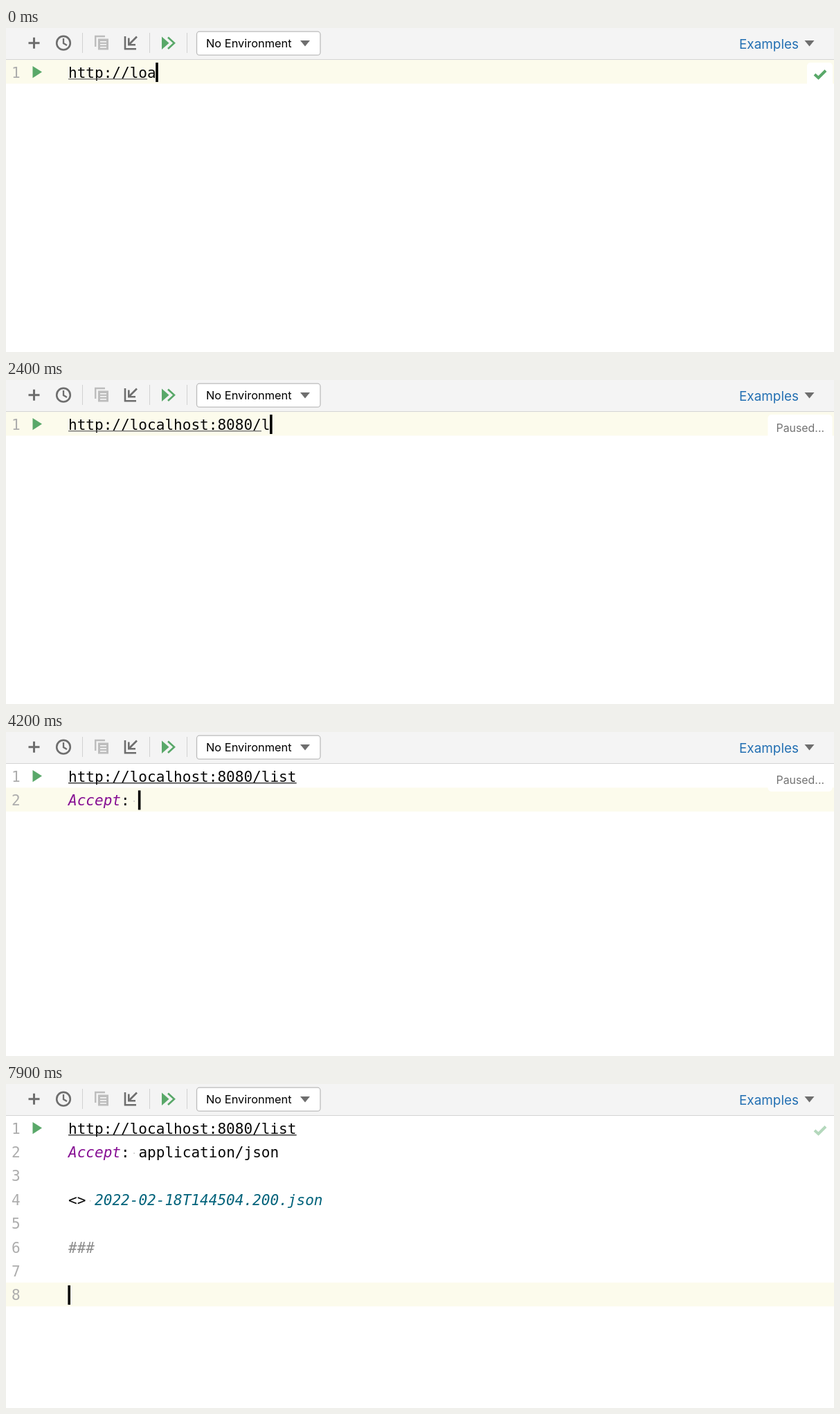
An HTML page with a canvas for the animation above (8 s loop, 1196 by 468 pixels).

```html
<!DOCTYPE html>
<html lang="en">
<head>
<meta charset="utf-8">
<title>HTTP request editor</title>
<style>
html, body { margin: 0; width: 100%; height: 100%; overflow: hidden; background: #fff; }
canvas { display: block; width: 1196px; height: 468px; }
</style>
</head>
<body>
<canvas id="stage"></canvas>
<script>
const W = 1196, H = 468, LOOP = 8000;
const canvas = document.getElementById('stage');
const ratio = window.devicePixelRatio || 1;
canvas.width = W * ratio;
canvas.height = H * ratio;
const ctx = canvas.getContext('2d');
ctx.scale(ratio, ratio);

const MONO = '"DejaVu Sans Mono", monospace';
const UI = 'Inter, sans-serif';
const CODE = '21.06px ' + MONO;
const CODE_ITALIC = 'italic ' + CODE;
const LIST = '21.6px ' + MONO;
const CHAR = 12.68, LEFT = 90, LINE = 34.4, TOP = 46, ROW = 31.7;
const GREY = '#6e6e6e', GREEN = '#59a869', BLUE = '#2470b3';

const hosts = ['loc', 'localhost', 'localhost:80', 'localhost:3000', 'localhost:8080'];
const paths = ['list', 'login', 'logout'];
const headers = ['Accept', 'Accept-Additions', 'Accept-Charset', 'Accept-Datetime',
  'Accept-Encoding', 'Accept-Features', 'Accept-Language', 'Accept-Patch',
  'Accept-Post', 'Accept-Ranges', 'Access-Control'];
const types = ['application/atom+xml', 'application/ecmascript', 'application/json',
  'application/vnd.api+json', 'application/x-www-form-urlencoded',
  'application/xhtml+xml', 'application/xml', 'audio/mpeg', 'audio/ogg',
  'multipart/form-data', 'text/html'];

const hostList = { x: 137, line: 1, items: hosts, match: 3, icons: true };
const pathList = { x: 327, line: 1, items: paths, match: 0, icons: true };
const headerList = { x: 82, line: 2, items: headers, match: 3, bar: true };
const typeList = { x: 183, line: 2, items: types, match: 1, bar: true };
const with_ = (list, sel, extra) => ({ ...list, sel, active: sel > 0, ...extra });
const onePath = n => with_(pathList, 0, { items: ['list'], match: n });

// Each step changes only the fields it names.
const steps = [
  [0, { url: 'http://loa', ruled: 9, head: '', lines: 1, row: 1, caret: true,
        status: 'ok', list: null, result: false, hashes: 0, compact: false }],
  [100, { url: 'http://lo' }],
  [200, { list: with_(hostList, 0, { match: 2, items: hosts.slice(1) }) }],
  [300, { url: 'http://loc', list: null }],
  [400, { list: with_(hostList, 0) }],
  [700, { caret: false }],
  [1000, { caret: true, status: 'paused' }],
  [1200, { list: with_(hostList, 1) }],
  [1400, { list: with_(hostList, 2) }],
  [1500, { list: with_(hostList, 3) }],
  [1600, { list: with_(hostList, 4) }],
  [1800, { url: 'http://localhost:8080', list: null }],
  [2000, { ruled: 21 }],
  [2100, { url: 'http://localhost:8080/', ruled: 22 }],
  [2300, { list: with_(pathList, 0) }],
  [2400, { url: 'http://localhost:8080/l', list: null }],
  [2500, { url: 'http://localhost:8080/li', list: onePath(2) }],
  [2600, { url: 'http://localhost:8080/lis', list: onePath(3) }],
  [2700, { url: 'http://localhost:8080/list', list: onePath(4) }],
  [2900, { list: null }],
  [3100, { lines: 2, row: 2, ruled: 26 }],
  [3600, { head: 'A' }],
  [3700, { head: 'Ac', list: with_(headerList, 0, { match: 2 }) }],
  [3800, { head: 'Acc', list: with_(headerList, 0) }],
  [4000, { head: 'Accept', list: null }],
  [4100, { head: 'Accept:' }],
  [4200, { head: 'Accept: ' }],
  [4300, { list: with_(typeList, 0, { match: 0 }) }],
  [4600, { list: null }],
  [4700, { head: 'Accept: a' }],
  [4800, { list: with_(typeList, 0) }],
  [5000, { list: with_(typeList, 1) }],
  [5100, { list: with_(typeList, 2) }],
  [5300, { head: 'Accept: application/json', list: null }],
  [5500, { status: 'ok' }],
  [6100, { lines: 4, result: true, compact: true }],
  [6500, { compact: false }],
  [6700, { row: 4 }],
  [6900, { lines: 5, row: 5 }],
  [7000, { lines: 6, row: 6, status: 'fading' }],
  [7400, { hashes: 1 }],
  [7500, { hashes: 2 }],
  [7600, { hashes: 3 }],
  [7700, { lines: 7, row: 7 }],
  [7900, { lines: 8, row: 8 }]
];

// time, x, y
const mousePath = [[5400, 330, 225], [5800, 43, 59], [6000, 43, 59],
  [6200, 390, 234], [6300, 464, 210], [6600, 470, 170], [6900, 470, 170]];

function stateAt(t) {
  const state = {};
  for (const [at, change] of steps) if (at <= t) Object.assign(state, change);
  return state;
}

function text(str, x, y, font, color) {
  ctx.font = font;
  ctx.fillStyle = color;
  ctx.fillText(str, x, y);
}

function rect(x, y, w, h, color) {
  ctx.fillStyle = color;
  ctx.fillRect(x, y, w, h);
}

function round(x, y, w, h, r, fill, stroke) {
  ctx.beginPath();
  ctx.roundRect(x, y, w, h, r);
  ctx.fillStyle = fill;
  ctx.fill();
  if (stroke) {
    ctx.strokeStyle = stroke;
    ctx.lineWidth = 1.3;
    ctx.stroke();
  }
}

function trace(points) {
  ctx.beginPath();
  points.forEach(([x, y]) => ctx.lineTo(x, y));
}

function shape(color, ...points) {
  trace(points);
  ctx.fillStyle = color;
  ctx.fill();
}

function stroke(color, width, ...points) {
  trace(points);
  ctx.strokeStyle = color;
  ctx.lineWidth = width;
  ctx.stroke();
}

function circle(x, y, r, color) {
  ctx.beginPath();
  ctx.arc(x, y, r, 0, Math.PI * 2);
  ctx.fillStyle = color;
  ctx.fill();
}

function arrowDown(x, y) {
  shape(GREY, [x - 7, y - 4], [x + 7, y - 4], [x, y + 4.5]);
}

const baseline = line => TOP + (line - 1) * LINE + 25.6;
const column = n => LEFT + n * CHAR;

function drawToolbar(compact) {
  rect(0, 0, W, 45, '#f4f4f4');
  rect(0, 45, W, 1, '#d4d4d4');
  rect(32.5, 20.2, 16, 3, GREY);
  rect(39, 13.7, 3, 16, GREY);

  ctx.beginPath();
  ctx.arc(83, 21.7, 9.8, 0, Math.PI * 2);
  ctx.strokeStyle = GREY;
  ctx.lineWidth = 2.6;
  ctx.stroke();
  stroke(GREY, 2.3, [83, 15], [83, 22], [88, 25]);

  const pale = '#bdbdbd';
  stroke(pale, 2.4, [143, 12], [129.2, 12], [129.2, 27]);
  rect(133, 15.5, 15, 16, pale);
  for (let i = 0; i < 3; i++) rect(136, 19 + i * 4, 9, 1.7, '#f4f4f4');

  stroke(GREY, 2.6, [172, 12], [172, 30.2], [188, 30.2]);
  stroke(GREY, 2.6, [189, 12.5], [178, 23.5]);
  stroke(GREY, 2.6, [177.3, 14.5], [177.3, 24.3], [187, 24.3]);

  rect(110, 7, 1, 29, '#d2d2d2');
  rect(207, 7, 1, 29, '#d2d2d2');
  if (!compact) {
    rect(261, 7, 1, 29, '#d2d2d2');
    shape(GREEN, [225, 12.5], [235.5, 21.7], [225, 31]);
    stroke(GREEN, 2.6, [234, 13.5], [243, 21.7], [234, 30]);
  }

  const x = compact ? 220.5 : 275;
  round(x + 0.5, 5.2, 178.5, 34, 4, '#fff', '#bcbcbc');
  text('No Environment', x + 14, 27.8, '16.4px ' + UI, '#000');
  arrowDown(x + 157, 22);
  text('Examples', 1059, 29.6, '18.9px ' + UI, BLUE);
  arrowDown(1160.5, 22);
}

function drawStatus(status) {
  if (status === 'paused') {
    round(1100.5, 50, 93, 36, 5, '#fff');
    text('Paused...', 1112.5, 75, '15.9px ' + UI, '#737373');
    return;
  }
  round(1157, 50, 37, 36, 5, '#fff');
  stroke(status === 'ok' ? GREEN : '#b4d8bc', 4, [1168, 67], [1173.5, 72], [1184, 61.5]);
}

function spaceDot(col, line) {
  circle(column(col + 0.5), baseline(line) - 6, 0.9, '#c4c4c4');
}

function drawEditor(s) {
  rect(0, TOP + (s.row - 1) * LINE, W, LINE, '#fcfbec');
  drawStatus(s.status);
  for (let i = 1; i <= s.lines; i++) text(i, 8, baseline(i), CODE, '#adadad');
  shape(GREEN, [38.5, 55], [52, 63.6], [38.5, 72.2]);

  text(s.url, LEFT, baseline(1), CODE, '#080808');
  rect(LEFT, 73, Math.min(s.ruled, s.url.length) * CHAR, 1.4, s.ruled === 26 ? '#333' : '#737373');

  text(s.head.slice(0, 6), LEFT, baseline(2), CODE_ITALIC, '#871094');
  text(s.head.slice(6), column(6), baseline(2), CODE, '#080808');
  if (s.head.length > 7) spaceDot(7, 2);

  if (s.result) {
    text('<>', LEFT, baseline(4), CODE, '#080808');
    spaceDot(2, 4);
    text('2022-02-18T144504.200.json', column(3), baseline(4), CODE_ITALIC, '#00627a');
  }
  text('#'.repeat(s.hashes), LEFT, baseline(6), CODE_ITALIC, '#8c8c8c');

  if (s.caret) {
    const lengths = { 1: s.url.length, 2: s.head.length, 4: 29, 6: s.hashes };
    rect(column(lengths[s.row] || 0) - 0.6, TOP + (s.row - 1) * LINE + 4, 3.6, 28, '#000');
  }
}

function globe(x, y, back) {
  circle(x, y, 11, GREY);
  shape(back, [x - 8.5, y - 1], [x - 2, y + 4], [x - 1, y + 8.8], [x - 6, y + 7], [x - 8.8, y + 3]);
  shape(back, [x + 2, y - 8.5], [x + 3, y - 4], [x - 2, y - 2], [x - 2, y + 1],
    [x + 3, y + 1], [x + 5, y + 5], [x + 7, y + 5], [x + 9, y], [x + 7, y - 5.5]);
}

function drawList(list) {
  const { x, items, match, sel } = list;
  const y = TOP + list.line * LINE + 0.4;
  const h = list.icons ? items.length * ROW + 37 : 420;
  ctx.save();
  ctx.shadowColor = 'rgba(0,0,0,0.24)';
  ctx.shadowBlur = 11 * ratio;
  ctx.shadowOffsetY = 4 * ratio;
  rect(x, y, 788, h, '#f8f8f8');
  ctx.restore();
  ctx.strokeStyle = '#c9c9c9';
  ctx.lineWidth = 1;
  ctx.strokeRect(x, y, 788, h);

  items.forEach((item, i) => {
    const top = y + 0.5 + i * ROW;
    const back = i !== sel ? '#f8f8f8' : list.active ? '#cfe5fd' : '#e4e4e4';
    if (i === sel) rect(x + 0.5, top, 787, ROW, back);
    const left = x + (list.icons ? 42 : 8);
    if (list.icons) globe(x + 22, top + 15.4, back);
    text(item, left, top + 23.3, LIST, '#000');
    // Repaint the matching letters only, so they carry no dark edge.
    const part = item.slice(0, match);
    if (part) {
      rect(left - 1, top + 1, part.length * 13 + 1, ROW - 2, back);
      text(part, left, top + 23.3, LIST, BLUE);
    }
    if (item === 'Access-Control') rect(left, top + 15.5, item.length * 13, 1.8, '#000');
  });

  if (list.icons) {
    const base = y + items.length * ROW + 25;
    const font = '16.05px ' + UI;
    text('Press', x + 16, base, font, '#808080');
    stroke('#808080', 1.4, [x + 65, base - 6], [x + 71, base - 11.5], [x + 77, base - 6]);
    text('. to choose the selected (or first) suggestion and insert a dot afterwards',
      x + 78.5, base, font, '#808080');
    text('Next Tip', x + 637, base, font, BLUE);
    for (let i = -1; i < 2; i++) circle(x + 771.5, base - 7 + i * 7.5, 2.5, GREY);
  }
  if (list.bar) round(x + 772.5, y + 2, 13.5, 178, 6.5, '#838383');
}

function drawMouse(t) {
  const next = mousePath.findIndex(p => p[0] > t);
  if (next < 1) return;
  const [t0, x0, y0] = mousePath[next - 1];
  const [t1, x1, y1] = mousePath[next];
  const k = (t - t0) / (t1 - t0);
  const x = x0 + (x1 - x0) * k, y = y0 + (y1 - y0) * k;
  if (x < 80) {
    const tip = [[x, y], [x, y + 16], [x + 4, y + 12.5], [x + 7, y + 18],
      [x + 9, y + 17], [x + 6.5, y + 11.5], [x + 11.5, y + 11.5], [x, y]];
    stroke('#fff', 2.5, ...tip);
    shape('#000', ...tip);
    return;
  }
  stroke('#222', 1.5, [x, y - 6], [x, y + 6]);
  for (const side of [-1, 1]) {
    stroke('#222', 1.5, [x - 3.5, y + side * 7], [x, y + side * 5.5], [x + 3.5, y + side * 7]);
  }
  stroke('#222', 1.2, [x - 2, y + 2.5], [x + 2, y + 2.5]);
}

function draw(now) {
  const t = Math.floor((now % LOOP) / 100) * 100;
  const state = stateAt(t);
  rect(0, 0, W, H, '#fff');
  drawEditor(state);
  drawToolbar(state.compact);
  if (state.list) drawList(state.list);
  drawMouse(t);
}

const start = performance.now();
function tick() {
  draw(performance.now() - start);
  requestAnimationFrame(tick);
}
tick();
</script>
</body>
</html>
```
